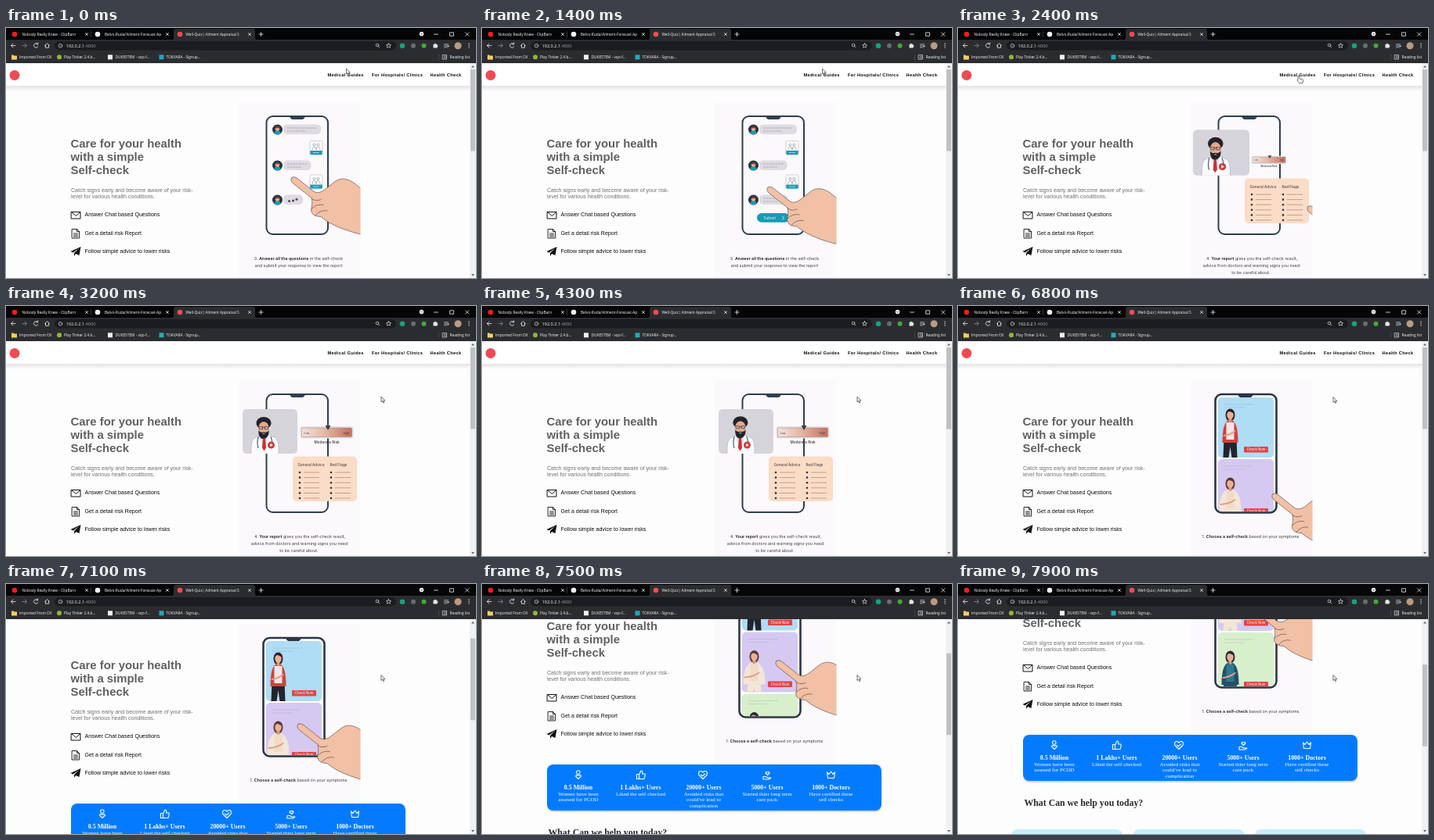
Recreate the animation shown at these times as an HTML page. Size 600 by 320 pixels, loop 8 s.

```html
<!DOCTYPE html>
<html lang="en">
<head>
<meta charset="utf-8">
<title>Health self-check</title>
<style>
  html, body { margin: 0; width: 100%; height: 100%; overflow: hidden; background: #fff; }
  svg { display: block; font-family: "Liberation Sans", Arial, sans-serif; }
  .ui { font-family: "Open Sans", "Noto Sans", sans-serif; font-size: 4.8px; fill: #fafafa; }
  .nav { font-weight: bold; font-size: 5.7px; letter-spacing: .32px; fill: #0c0c0c; }
  .title { font-weight: bold; font-size: 14.9px; fill: #606062; }
  .body { font-size: 7.1px; fill: #707072; }
  .item { font-size: 7.1px; fill: #0c0c0c; }
  .cap { font-family: Inter, "Open Sans", sans-serif; font-size: 5.35px; fill: #3a3a42; text-anchor: middle; }
  .cap .b { font-weight: 600; fill: #1c1c20; }
  .small { font-family: Inter, "Open Sans", sans-serif; font-size: 4.7px; fill: #3a3035; }
  .serif { font-family: "Liberation Serif", "Times New Roman", serif; }
  .stat { font-size: 7px; fill: #fff; text-anchor: middle; }
  .stat .b { font-size: 7.9px; font-weight: bold; }
  .line { fill: none; stroke-linecap: round; stroke-linejoin: round; }
</style>
</head>
<body>
<svg width="600" height="320" viewBox="0 0 600 320">
  <defs>
    <linearGradient id="shade" x2="0" y2="1"><stop stop-color="#e4e2e6"/><stop offset="1" stop-color="#fefdfe"/></linearGradient>
    <linearGradient id="risk"><stop stop-color="#f3e3da"/><stop offset=".5" stop-color="#e2b3a0"/><stop offset="1" stop-color="#c2705c"/></linearGradient>
    <clipPath id="panelClip"><rect x="297" y="95" width="155.500" height="228"/></clipPath>
    <clipPath id="screenClip"><rect x="330" y="115" width="75" height="148" rx="6"/></clipPath>
    <clipPath id="doctorClip"><rect x="-35" y="-28.500" width="70" height="57" rx="5"/></clipPath>
    <g id="avatar">
      <circle r="6.500" fill="#27323f"/>
      <path d="M-4 5a4 4 0 0 1 8 0Q0 8-4 5" fill="#1b9ab4"/>
      <circle cy="-1" r="2.800" fill="#e7a98e"/>
      <path d="M-3-1a3 3 0 0 1 6 0Q0-3-3-1" fill="#7b3d37"/>
    </g>
    <g id="pic">
      <rect width="16" height="18" rx="1.500" fill="#fff" stroke="#aab4bc" stroke-width=".6"/>
      <path d="M.3 12.500h15.400v4a1 1 0 0 1-1 1H1.300a1 1 0 0 1-1-1z" fill="#1b9ab4"/>
      <path class="line" d="M3 11.500q0-4 2.500-4t2.500 4q0-4 2.500-4t2.500 4M4 5a1.500 1.500 0 1 0 3 0a1.500 1.500 0 1 0-3 0M9 5a1.500 1.500 0 1 0 3 0a1.500 1.500 0 1 0-3 0" stroke="#77828a" stroke-width=".6"/>
      <path d="M4 15h8" stroke="#d8f1f5" stroke-width=".8" stroke-dasharray="2 .6"/>
    </g>
    <g id="phone">
      <rect x="332.500" y="113" width="78.500" height="151" rx="8" class="line" stroke="#2f3e4e" stroke-width="2"/>
      <path d="M362 113h20q-1.500 4-4 4h-12q-2.500 0-4-4" fill="#2f3e4e"/>
    </g>
  </defs>

  <rect width="600" height="320" fill="#fefdfe"/>

  <g id="page">
    <rect y="74" width="592" height="7" fill="url(#shade)"/>
    <rect y="45" width="592" height="29" fill="#fff"/>
    <circle cx="11" cy="60.500" r="6.500" fill="#f04b54"/>
    <g class="nav">
      <text x="410.500" y="62">Medical Guides</text>
      <text x="467" y="62">For Hospitals/ Clinics</text>
      <text x="541.500" y="62">Health Check</text>
    </g>
    <g class="title">
      <text x="82.500" y="153">Care for your health</text>
      <text x="82.500" y="170">with a simple</text>
      <text x="82.500" y="187">Self-check</text>
    </g>
    <g class="body">
      <text x="83" y="210">Catch signs early and become aware of your risk-</text>
      <text x="83" y="218.300">level for various health conditions.</text>
    </g>
    <g class="item">
      <text x="100.500" y="241.300">Answer Chat based Questions</text>
      <text x="100.500" y="264.500">Get a detail risk Report</text>
      <text x="100.500" y="287.800">Follow simple advice to lower risks</text>
    </g>
    <g class="line" stroke="#111">
      <path d="M83.500 235.500h11.500v8.500h-11.500zl5.800 5 5.700-5"/>
      <path d="M84.500 257.500h6l3 3v8.500h-9zM90.500 257.500v3h3M86.500 263h5M86.500 265h5M86.500 267h5" stroke-width=".9"/>
    </g>
    <path d="M95.500 280l-2 11-4.500-2-2 3v-4l6-6-7.500 5.500-3-1.500z" fill="#111"/>

    <rect x="297" y="95" width="155.500" height="227" fill="#fcf9fd"/>
    <g clip-path="url(#panelClip)">
      <g id="chat">
        <use href="#phone"/>
        <use href="#avatar" x="346.500" y="130"/><use href="#avatar" x="346.500" y="176"/><use href="#avatar" x="346.500" y="220"/>
        <use href="#pic" x="388" y="144.500"/><use href="#pic" x="388" y="188"/>
        <g fill="#dedce2">
          <rect x="354" y="123.500" width="48" height="12.500" rx="5"/>
          <rect x="354" y="169.500" width="35.500" height="12.500" rx="5"/>
          <rect id="reply" x="354" y="213.500" height="12.500" rx="5"/>
        </g>
        <path d="M359 128h37M359 132h24M359 174h26M359 178h18" stroke="#9a99a2" stroke-width=".7" stroke-dasharray="3 .8"/>
        <path id="replyText" d="M359 218h26M359 222h18" stroke="#9a99a2" stroke-width=".7" stroke-dasharray="3 .8"/>
        <g id="dots" fill="#4b4b55"><circle cx="361.500" cy="221.500" r="1.500"/><circle cx="366.500" cy="221" r="1.500"/><circle cx="371" cy="219.300" r="1.500"/></g>
        <g id="submit">
          <rect x="351" y="237" width="41.500" height="11.800" rx="5.900" fill="#189ab4"/>
          <text class="small" x="359.500" y="244.700" style="fill:#e6f7fa">Submit</text>
          <path class="line" d="M383.500 240.800l2 2.200-2 2.200" stroke="#fff" stroke-width=".8"/>
        </g>
        <text class="cap" x="373.500" y="297">3. <tspan class="b">Answer all the questions</tspan> in the self-check</text>
        <text class="cap" x="373.500" y="306">and submit your response to view the report</text>
      </g>

      <g id="report">
        <use href="#phone"/>
        <g id="doctor">
          <rect x="-35" y="-28.500" width="70" height="57" rx="5" fill="#d6d4db"/>
          <g clip-path="url(#doctorClip)">
            <path d="M-24 29q-1-19 5-21l9-4h7l9 4q6 2 5 21z" fill="#fbfbfd" stroke="#a9a9b4" stroke-width=".6"/>
            <path d="M-13 6h11l-2 10-3.500 5-3.500-5z" fill="#dfe8f0"/>
            <path d="M-9 8h3l1 13-2.500 4-2.500-4z" fill="#c8322f"/>
            <path class="line" d="M-15 7q-2 9 0 14M1 7q3 7 1 12" stroke="#47607a" stroke-width="1.200"/>
            <g id="head">
              <ellipse cx="-7.500" cy="-11" rx="9.500" ry="8" fill="#23222b"/>
              <rect x="-10.500" y="0" width="6" height="9" fill="#c08467"/>
              <ellipse cx="-7.500" cy="-4" rx="6.800" ry="9" fill="#e0aa8e"/>
              <path d="M-14.300-2q2 4 6.800 2.500 4.800 1.500 6.800-2.500 0 10-6.800 11t-6.800-11" fill="#23222b"/>
              <path class="line" d="M-13-6.500h4v3h-4zM-6-6.500h4v3h-4zM-9-5.500h3" stroke="#26252e" stroke-width=".6"/>
              <path d="M-9 2.500h3" stroke="#eee" stroke-width=".8"/>
            </g>
          </g>
          <circle cx="1.500" cy="17.500" r="4.500" fill="#d2393c"/>
          <path d="M.3 15.300v4.400l3.500-2.200z" fill="#fff"/>
        </g>
        <g id="slider">
          <rect x="-34" y="-8" width="68" height="15.500" rx="2.500" fill="#e3e0e4"/>
          <rect x="-32" y="-6" width="64" height="11.500" rx="1.500" fill="url(#risk)" stroke="#99857f" stroke-width=".5"/>
          <path d="M-2-9h7l-3.500 6z" fill="#2f3e4e"/>
          <g class="small" style="font-size:3.400px"><text x="-29" y="1.500">Low</text><text x="21" y="1.500">High</text></g>
          <text class="small" x="0" y="13.500" text-anchor="middle" font-weight="500">Moderate Risk</text>
        </g>
        <g id="advice">
          <rect x="-41" y="-28.500" width="82" height="57.500" rx="5" fill="#fbdcc6"/>
          <text class="small" x="-34.500" y="-16">General Advice</text>
          <text class="small" x="6.500" y="-16">Red Flags</text>
        </g>
        <text class="cap" x="375" y="297">4. <tspan class="b">Your report</tspan> gives you the self-check result,</text>
        <text class="cap" x="374.500" y="306">advice from doctors and warning signs you need</text>
        <text class="cap" x="374" y="315">to be careful about.</text>
      </g>

      <g id="pick">
        <rect x="328.500" y="112.500" width="78" height="152" rx="8" fill="#fff"/>
        <g clip-path="url(#screenClip)"><g id="cards"></g></g>
        <rect x="328.500" y="113" width="78" height="151.500" rx="8" class="line" stroke="#2c3547" stroke-width="2.600"/>
        <path d="M357 113h20q-1.500 4-4 4h-12q-2.500 0-4-4" fill="#2c3547"/>
        <text class="cap" x="373.500" y="297">1. <tspan class="b">Choose a self-check</tspan> based on your symptoms</text>
      </g>

      <g id="hand" class="line" stroke="#4a3d3e" stroke-width=".6">
        <path fill="#f1c0a5" d="M365 191.500c-2 2-1 5 1 7l24 19c1 4 1 8 0 13-2 7 4 11 12 11 11 10 31 18 53 23v-57c-14-14-25-18-35-11l-14 11c-6 4-10 4-14 1l-20-16c-3-2-5-2.500-7-1z"/>
        <path d="M390 218.500q6 4 12 1M390 231.500q7-7 15-5M395 240q7-8 15-6"/>
      </g>
    </g>

    <rect x="83" y="327" width="427" height="59" rx="8" fill="#d5d8de"/>
    <rect x="83" y="325" width="427" height="59" rx="8" fill="#047bff"/>
    <g id="stats" class="serif stat"></g>
    <g class="line" stroke="#fff" stroke-width="1.100">
      <path d="M120.500 335a2.300 2.300 0 1 0 4.600 0a2.300 2.300 0 1 0-4.600 0M123 343.500l-3.500-3.300q0-2.500 3.500-1 3.500-1.500 3.500 1z"/>
      <path d="M197.500 337.500h3v6h-3zM200.500 338l2.500-5q2.500 0 1.500 4h3.500q.7 3-1 6.500h-6.500"/>
      <path d="M282 343.500l-5-5q-1.500-4.500 2-5 2-.2 3 1.800 1-2 3-1.800 3.500.5 2 5zM279.500 338l2 1.800 3-2.800"/>
      <path d="M359 340.500h3l3 1.500h4l-3 2h-7zM364.500 338.500l-2.500-2.500q0-2 2.500-1 2.500-1 2.500 1z"/>
      <path d="M440.500 335l2.500 2.500 2.500-3.500 2.500 3.500 2.500-2.500-1 7.500h-8z"/>
    </g>
    <text class="serif" x="84.500" y="415.500" font-size="11.800" font-weight="bold" fill="#2a2a2e">What Can we help you today?</text>
    <g fill="#c5edfb">
      <rect x="68" y="446" width="142" height="60" rx="8"/>
      <rect x="223.500" y="446" width="142" height="60" rx="8"/>
      <rect x="379" y="446" width="142" height="60" rx="8"/>
    </g>
  </g>

  <rect x="592" y="45" width="8" height="275" fill="#f1f0f2"/>
  <rect id="thumb" x="593" y="53" width="6" height="104.500" fill="#c0c0c2"/>
  <path d="M594 50.500l2-2.500 2 2.500zM594 315l2 2.500 2-2.500z" fill="#606064"/>

  <g class="ui">
    <rect width="600" height="45" fill="#2b2c2f"/>
    <rect width="600" height="15" fill="#060607"/>
    <path d="M212 15q2 0 2-3V4q0-3 3-3h98q3 0 3 3v8q0 3 2 3z" fill="#2b2c2f"/>
    <path d="M108.500 4v8" stroke="#55565a" stroke-width=".6"/>
    <circle cx="11" cy="8" r="3.300" fill="#f01c1c"/>
    <circle cx="117" cy="8" r="3.300" fill="#f2f2f2"/>
    <circle cx="222" cy="8" r="3.300" fill="#f04b54"/>
    <text x="20.500" y="9.700">Nobody Really Knew - ClipBarn</text>
    <text x="126" y="9.700">Belvo-Ruda/Ailment-Forecast-Ap</text>
    <text x="229.500" y="9.700">Well-Quiz| Ailment Appraisal S</text>
    <g class="line" stroke="#f0f0f0" stroke-width=".8">
      <path d="M101.500 6.500l3 3m0-3l-3 3M204.500 6.500l3 3m0-3l-3 3M309.500 6.500l3 3m0-3l-3 3M323 8h5m-2.500-2.500v5"/>
      <path d="M546.500 8h5M567 5.800h4.400v4.400h-4.400zM586.500 5.800l4.400 4.400m0-4.400l-4.400 4.400"/>
      <path d="M12 22.500H6.500m2.500-2.500l-2.500 2.500 2.500 2.500"/>
      <path d="M21 22.500h5.500M24 20l2.500 2.500L24 25" stroke="#8a8b8e"/>
      <path d="M40.500 20.500a2.800 2.800 0 1 0 .3 3.300M40.700 18.800v2h-2M49.500 22.500l3-2.800 3 2.800M50.500 22v3.200h4V22"/>
    </g>
    <circle cx="530.500" cy="7.500" r="2.800" fill="#eee"/>
    <path d="M529.300 7l1.200 1.300 1.200-1.300" class="line" stroke="#222" stroke-width=".6"/>
    <rect x="62" y="17" width="436" height="11.500" rx="5.700" fill="#1b1c1f"/>
    <circle cx="69.500" cy="22.700" r="2.300" class="line" stroke="#d6d6d6" stroke-width=".7"/>
    <path d="M69.500 22.500v1.200M69.500 21.300v.3" stroke="#d6d6d6" stroke-width=".6"/>
    <text x="76.500" y="24.700" font-size="5.600">192.0.2.1<tspan fill="#9b9ca0">:4000</tspan></text>
    <g class="line" stroke="#e0e0e0" stroke-width=".7">
      <circle cx="474" cy="22" r="1.800"/>
      <path d="M475.500 23.500l1.500 1.500M488.500 19.500l.9 2 2.100.2-1.600 1.400.5 2.100-1.900-1.100-1.900 1.100.5-2.100-1.600-1.400 2.100-.2z"/>
      <path d="M559.500 20.800h5M559.500 22.800h3M559.500 24.800h3"/>
    </g>
    <circle cx="506" cy="22.700" r="3.300" fill="#16a27f"/>
    <circle cx="520" cy="22.700" r="3" fill="#6a6d70"/>
    <circle cx="533.500" cy="22.700" r="3" fill="#43a83c"/>
    <path d="M545.500 20.800h1.500a1 1 0 0 1 2 0h1.500v1.500a1 1 0 0 1 0 2v1.200h-5z" fill="#e6e6e6"/>
    <path d="M563.500 21.800v3l2.500-1.500z" fill="#e0e0e0"/>
    <circle cx="577" cy="22.700" r="4.500" fill="#b99a83"/>
    <circle cx="591" cy="20.300" r=".7"/><circle cx="591" cy="22.700" r=".7"/><circle cx="591" cy="25.100" r=".7"/>
    <path d="M7 34.500h2.500l1 1H14v5H7z" fill="#f2cf62"/>
    <circle cx="68" cy="37.300" r="3" fill="#8fb73c"/>
    <rect x="130" y="34.300" width="6" height="6" fill="#f0f0f0"/>
    <rect x="195.500" y="34.300" width="6" height="6" fill="#22a9b8"/>
    <text x="17" y="39">Imported From OX</text>
    <text x="74" y="39">Play Tinker 2.4.b...</text>
    <text x="139.500" y="39">DUKESTEM - vqo-f...</text>
    <text x="204.500" y="39">TOKVARA - Signup...</text>
    <path d="M552.500 33.500v8" stroke="#55565a" stroke-width=".6"/>
    <path d="M557.500 34.500h5v5.500h-5zM559 36.300h2.500M559 38.200h2.500" class="line" stroke="#ddd" stroke-width=".7"/>
    <text x="566.500" y="39">Reading list</text>
  </g>

  <g id="cursor" stroke="#33333a" stroke-width=".7" stroke-linejoin="round" fill="#fff">
    <path id="arrow" d="M0 0v7l1.600-1.500 1.200 2.600 1.100-.5-1.200-2.500h2.200z"/>
    <path id="pointer" d="M1 0q1 0 1 1v3l4 .8q.8.300.6 1.500l-.6 3.200H1.800L-1 6q0-1 1-.5V1q0-1 1-1z"/>
  </g>
</svg>
<script>
const $ = id => document.getElementById(id);
const show = (id, on) => { $(id).style.display = on ? '' : 'none'; };
const place = (id, x, y, s = 1) => $(id).setAttribute('transform', `translate(${x} ${y}) scale(${s})`);

// Linear interpolation through keys of the form [time, ...values].
function path(t, ...keys) {
  const i = keys.findIndex(k => k[0] > t);
  if (i === 0) return keys[0].slice(1);
  if (i < 0) return keys[keys.length - 1].slice(1);
  const a = keys[i - 1], b = keys[i], f = (t - a[0]) / (b[0] - a[0]);
  return a.slice(1).map((v, j) => v + (b[j + 1] - v) * f);
}

const stats = [
  [123, '0.5 Million', 'Women have been', 'assesed for PCOD'],
  [202.5, '1 Lakhs+ Users', 'Liked the self checked'],
  [283, '20000+ Users', 'Avoided risks that', "could've lead to", 'complication'],
  [364, '5000+ Users', 'Started thier long term', 'care pack'],
  [445.5, '1000+ Doctors', 'Have certified these', 'self checks']
];
$('stats').innerHTML = stats.map(([x, head, ...lines]) =>
  `<text class="b" x="${x}" y="357">${head}</text>` +
  lines.map((s, i) => `<text x="${x}" y="${365 + i * 7.3}">${s}</text>`).join('')).join('');

for (let i = 0; i < 12; i++) {
  const x = i < 6 ? -32 : 8, y = -8 + i % 6 * 6.6;
  $('advice').innerHTML += `<circle cx="${x}" cy="${y}" r="1.300" fill="#3a3035"/>
    <path d="M${x + 5} ${y}h20" stroke="#b2917f" stroke-width=".8"/>`;
}

// A patient with head height y and half body width w.
const card = ([bg, hair, top, trim, legs, y, w], i) => `<g transform="translate(332 ${117 + i * 79})">
  <rect width="71" height="77" rx="5" fill="${bg}"/>
  <path d="M8 9h38M8 13h26" stroke="#8f9bb0" stroke-width=".5" stroke-dasharray="1.500 1"/>
  <g transform="translate(15.500 ${y})">
    <path d="M-8 30H8l1 ${47 - y}H2L0 42l-2 ${35 - y}h-7z" fill="${legs}"/>
    <ellipse cy="1.500" rx="6" ry="8" fill="${hair}"/>
    <path d="M${-w} 37q0-25 ${w - 3}-28h6q${w - 3} 3 ${w - 3} 28z" fill="${top}"/>
    <path d="M-5 11H5V33H-5z" fill="${trim}"/>
    <path d="M-2 5h4v5q-2 2-4 0z" fill="#d99a7e"/>
    <ellipse cy="1.500" rx="4.200" ry="5.300" fill="#e9b195"/>
    <path d="M-5 0q2-6 10 0v-3q-5-5-10 0z" fill="${hair}"/>
    <path d="M${2 - w} 28Q0 27 6 22" class="line" stroke="#e0a185" stroke-width="2"/>
  </g>
  <rect x="33" y="63" width="31" height="7.500" rx="1" fill="#e04648"/>
  <text class="small" x="48.500" y="68.300" text-anchor="middle" style="fill:#fff;font-size:4.300px">Check Now</text>
</g>`;
$('cards').innerHTML = [
  ['#aeddf5', '#2b2128', '#d4403f', '#f4e6e4', '#23242c', 21, 10],
  ['#d5c9f2', '#5a3b32', '#f3e6d6', '#efdcc6', '#f3e6d6', 30, 14],
  ['#d7efcb', '#2a2a33', '#23506a', '#2f7890', '#23506a', 30, 11]
].map(card).join('');

function draw(now) {
  const t = Math.floor(now % 8000 / 100) * 100;

  const [scroll] = path(t, [6800, 0], [7000, 44], [7200, 44], [7500, 94], [7800, 132]);
  place('page', 0, -scroll);
  $('thumb').setAttribute('y', 53 + scroll * .38);

  show('chat', t < 1900);
  show('report', t >= 1900 && t < 6500);
  show('pick', t >= 6500);

  // Chat: the typing bubble turns into text, then the button comes up.
  $('reply').setAttribute('width', path(t, [100, 25], [300, 36])[0]);
  show('dots', t < 200);
  show('replyText', t >= 200);
  $('submit').setAttribute('opacity', path(t, [200, 0], [500, 1])[0]);

  // Report: the three cards pop up in turn.
  place('doctor', ...path(t, [1900, 337, 160.5, .6], [2300, 336, 159.5, 1.03], [2400, 336, 159.5, 1.03], [2700, 337, 160.5, 1]));
  place('advice', ...path(t, [2000, 407, 221, .6], [2300, 407, 221, 1]));
  place('slider', ...path(t, [2200, 390, 173, .45], [2400, 397, 169, .65], [2750, 409.5, 162, 1]));
  show('advice', t >= 2000);
  show('slider', t >= 2200);
  place('head', Math.sin(t / 290) * .5, Math.sin(t / 410) * .4);

  place('cards', 0, path(t, [7200, 0], [7800, -81])[0]);
  show('hand', t < 2600 || t >= 6500);
  place('hand', ...path(t, [1000, 0, 0], [1800, 0, 25], [1900, 0, 25], [2400, 82, 37], [2600, 110, 42],
    [6500, 80, 75], [7000, 8, 32], [7200, 8, 32], [7800, 14, -30]));

  const pointing = t >= 2200 && t < 2800;
  show('arrow', !pointing);
  show('pointer', pointing);
  place('cursor', ...path(t, [1900, 434.5, 52], [2300, 434, 61], [2400, 434, 61], [2700, 467, 62],
    [3100, 479, 116], [5500, 479, 116], [5700, 479, 116.5]));

  requestAnimationFrame(() => draw(performance.now()));
}
draw(0);
</script>
</body>
</html>
```
